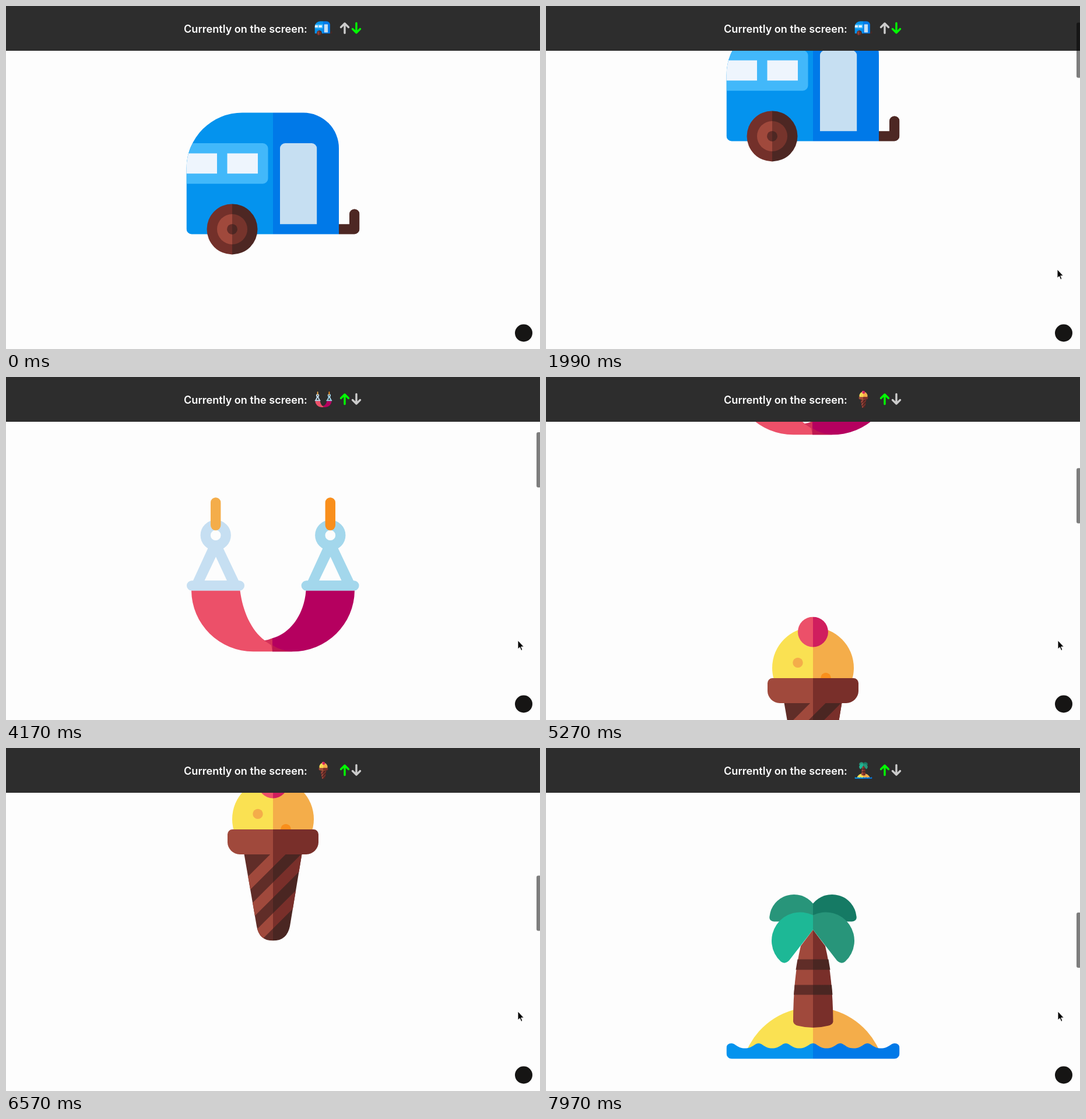
These frames come from a looping animation (916 by 590 pixels, 7990 ms). An HTML page:

```html
<!DOCTYPE html>
<html lang="en">
<head>
<meta charset="utf-8">
<title>Scrolling icons</title>
<style>
  html, body { margin: 0; width: 100%; height: 100%; overflow: hidden; background: #fdfdfd; }
  svg { display: block; }
  text { font: 600 18.1px Inter, "Open Sans", sans-serif; fill: #fff; }
  .arrow { fill: none; stroke-width: 3.4; stroke-linecap: round; stroke-linejoin: round; }
</style>
</head>
<body>
<svg id="stage" width="916" height="590" viewBox="0 0 916 590">
  <defs id="defs">
    <symbol id="caravan" viewBox="309.5 156.5 297 297">
      <clipPath id="body"><path id="shell" d="M309.5 279A96 96 0 0 1 405.5 183H510A61 61 0 0 1 571 244V392H318.5A9 9 0 0 1 309.5 383Z"/></clipPath>
      <use href="#shell" fill="url(#blue)"/>
      <g clip-path="url(#body)">
        <rect x="290" y="235.6" width="159.5" height="69.6" rx="9" fill="#42b8fa"/>
        <path d="M300 253H362V287.8H300ZM379.5 253H432V287.8H379.5Z" fill="#eef5fd"/>
      </g>
      <path d="M470 374.7V244.3a8.7 8.7 0 0 1 8.7-8.7H524.5a8.7 8.7 0 0 1 8.7 8.7V374.7Z" fill="#c6dff2"/>
      <path d="M571 374.7H589V357.5a8.75 8.75 0 0 1 17.5 0V383a9 9 0 0 1-9 9H571Z" fill="#4d2723"/>
      <circle cx="388" cy="383.4" r="43.5" fill="url(#tyre)"/>
      <circle cx="388" cy="383.4" r="26" fill="url(#rim)"/>
      <circle cx="388" cy="383.4" r="9" fill="url(#hub)"/>
    </symbol>

    <symbol id="swing" viewBox="309.5 191 297 297">
      <path d="M318 367H401.5C406 402 420 435 444 453L457 455V472H424A106 106 0 0 1 318 367Z" fill="#ec5069"/>
      <path d="M514.5 367H598A106 106 0 0 1 492 472H457V449C490 440 512 405 514.5 367Z" fill="#b5005f"/>
      <path d="M443 453Q450 452 457 449V472L455 461Z" fill="#d4315a"/>
      <path d="M457 461Q472 471 492 472H457Z" fill="#bf1750"/>
      <g fill="#c6dff2" stroke="#c6dff2">
        <g id="clasp" stroke-width="0">
          <circle cx="359.7" cy="272" r="17.5" fill="none" stroke-width="17.3"/>
          <path fill-rule="evenodd" d="M347 293L320 352H400L372 293ZM360 309L340.5 350H379Z"/>
          <rect x="310" y="350" width="99" height="17.4" rx="8.7"/>
        </g>
      </g>
      <path d="M544 293L517 352H597L569 293ZM556.6 309L537 350H575.6Z" fill="#a3d7ec" fill-rule="evenodd"/>
      <circle cx="556.3" cy="272" r="17.5" fill="none" stroke="#a3d7ec" stroke-width="17.3"/>
      <rect x="506.6" y="350" width="99" height="17.4" rx="8.7" fill="#a3d7ec"/>
      <rect x="351" y="207" width="17.4" height="56.5" rx="8.7" fill="#f4ad4a"/>
      <rect x="547.6" y="207" width="17.4" height="56.5" rx="8.7" fill="#f98f1c"/>
    </symbol>

    <symbol id="cone" viewBox="309.5 34 297 297">
      <circle cx="458" cy="122" r="70" fill="url(#yellow)"/>
      <circle cx="432" cy="113" r="8.7" fill="#f4ad4a"/>
      <circle cx="480" cy="139" r="8.7" fill="#f98f1c"/>
      <circle cx="458" cy="60" r="26" fill="url(#cherry)"/>
      <clipPath id="wafer"><path id="taper" d="M408.5 182H507.5L487 306Q482 331 458 331Q434 331 430 306Z"/></clipPath>
      <use href="#taper" fill="url(#bark)"/>
      <path d="M399 250L499 150M402 300L532 170M425 330L535 220" clip-path="url(#wafer)" stroke="url(#wood)" stroke-width="18.7"/>
      <path d="M380 148a8.5 8.5 0 0 1 8.5-8.5H527.5a8.5 8.5 0 0 1 8.5 8.5V161a21 21 0 0 1-21 21.5H401a21 21 0 0 1-21-21.5Z" fill="url(#wood)"/>
    </symbol>

    <symbol id="island" viewBox="309.5 244 297 297">
      <path d="M346 516A124 124 0 0 1 570 516V522H346Z" fill="url(#yellow)"/>
      <path id="sea" fill="url(#blue)"/>
      <path d="M391 298Q382 297 383.5 289A42 42 0 0 1 458 267A42 42 0 0 1 532.5 289Q534 297 525 298Z" fill="url(#leafBack)"/>
      <path d="M458 312L437 340Q424 395 424 470Q425 475 431 477Q458 484 485 477Q492 475 492.5 470Q492 395 479 340Z" fill="url(#wood)"/>
      <path d="M431.5 363H484.5L487.5 381H428.5ZM426.5 407H490L491.5 424H425Z" fill="url(#bark)"/>
      <path d="M458 287A49 49 0 0 0 403 367Q410 372 417 365L458 312L499 365Q506 372 513 367A49 49 0 0 0 458 287Z" fill="url(#leaf)"/>
    </symbol>
  </defs>

  <rect width="916" height="590" fill="#fdfdfd"/>
  <g id="page"></g>
  <rect width="916" height="77" fill="#2d2d2d"/>
  <text x="305" y="46">Currently on the screen:</text>
  <use id="current" x="529.5" y="23.5" width="30" height="30"/>
  <path id="up" class="arrow" d="M581 46.5V30M574.5 36.5L581 30L587.5 36.5"/>
  <path id="down" class="arrow" d="M601 29.5V46M594.5 39.5L601 46L607.5 39.5"/>
  <circle cx="888" cy="562.5" r="15" fill="#161514"/>
  <rect id="thumb" x="910" width="8" height="95" rx="3"/>
  <path id="cursor" d="M0 0V15L3.4 12L5.7 17.4L8 16.4L5.7 11.1H10.4Z" stroke="#fff"/>
</svg>

<script>
const LOOP = 7990, VIEW = 590, SIZE = 297, FIRST = 157, SPACING = 594.2;
const icons = ['caravan', 'swing', 'cone', 'island'];
const el = id => document.getElementById(id);

// Two-tone fills: left colour, right colour, x of the hard edge
const tones = {
  blue: ['#0493ee', '#0079e8'],
  yellow: ['#fae152', '#f4ad4a'],
  cherry: ['#ec5069', '#d01e5e'],
  wood: ['#a0493c', '#792f2a'],
  bark: ['#602d28', '#4a2622'],
  leaf: ['#1db896', '#28957a'],
  leafBack: ['#28957a', '#157a64'],
  tyre: ['#73302a', '#4d2723', 388],
  rim: ['#a0493c', '#76342c', 388],
  hub: ['#642d28', '#4d2723', 388],
};
el('defs').innerHTML += Object.entries(tones).map(([id, [left, right, x = 458]]) =>
  `<linearGradient id="${id}" gradientUnits="userSpaceOnUse" x1="${x - .1}" x2="${x + .1}" y1="0" y2="0">
    <stop offset=".5" stop-color="${left}"/><stop offset=".5" stop-color="${right}"/></linearGradient>`).join('');

el('sea').setAttribute('d', 'M309.5 516Q309.5 507.5 318 507.5' +
  'c7 0 10 8.5 23.3 8.5s16.4-8.5 23.37-8.5'.repeat(6) +
  'Q606.5 507.5 606.5 516V525a9 9 0 0 1-9 9H318.5a9 9 0 0 1-9-9Z');

el('page').innerHTML = icons.map((id, i) =>
  `<use href="#${id}" x="309.5" y="${FIRST + i * SPACING}" width="${SIZE}" height="${SIZE}"/>`).join('');

// Smooth curve through [time, value] points that never overshoots them
function track(points) {
  const slope = i => (points[i + 1][1] - points[i][1]) / (points[i + 1][0] - points[i][0]);
  const tangents = points.map((_, i) => {
    if (i === 0 || i === points.length - 1) return 0;
    const a = slope(i - 1), b = slope(i);
    return a * b > 0 ? 2 * a * b / (a + b) : 0;
  });
  return t => {
    if (t <= points[0][0]) return points[0][1];
    const i = points.findIndex(p => p[0] >= t) - 1;
    if (i < 0) return points.at(-1)[1];
    const [t0, v0] = points[i], [t1, v1] = points[i + 1];
    const d = t1 - t0, u = (t - t0) / d, w = 1 - u;
    return w * w * (1 + 2 * u) * v0 + u * u * (3 - 2 * u) * v1
      + d * u * w * (w * tangents[i] - u * tangents[i + 1]);
  };
}

const scrollAt = track([[1630, 0], [1990, 160], [2450, 278], [3050, 286], [3150, 288], [3650, 480],
  [4170, 560], [4500, 760], [4840, 922], [5270, 933], [5500, 960], [6000, 1200],
  [6570, 1311], [7000, 1385], [7250, 1480], [7600, 1630], [7970, 1695]]);
const cursorX = track([[20, 530], [300, 660], [600, 903], [810, 877], [2000, 877], [2400, 878]]);
const cursorY = track([[20, 590], [300, 380], [450, 352], [810, 453]]);

function draw(t) {
  const scroll = scrollAt(t);
  const index = icons.findLastIndex((_, i) => i === 0 || FIRST + i * SPACING + SIZE / 2 - scroll <= VIEW);
  const fade = Math.min(1, Math.max(0, (3140 - t) / 160));

  el('page').setAttribute('transform', `translate(0 ${-Math.round(scroll)})`);
  el('current').setAttribute('href', '#' + icons[index]);
  el('up').setAttribute('stroke', index ? '#0f0' : '#ccc');
  el('down').setAttribute('stroke', index ? '#ccc' : '#0f0');
  el('thumb').setAttribute('y', 2 + scroll * .1658);
  el('thumb').setAttribute('opacity', t < 1640 ? 0 : .5 * (t < 3150 ? fade : 1));
  el('cursor').setAttribute('transform', `translate(${cursorX(t)} ${cursorY(t)})`);
  el('cursor').setAttribute('visibility', t < 20 ? 'hidden' : 'visible');
}

function frame() {
  draw(performance.now() % LOOP);
  requestAnimationFrame(frame);
}
frame();
</script>
</body>
</html>
```
